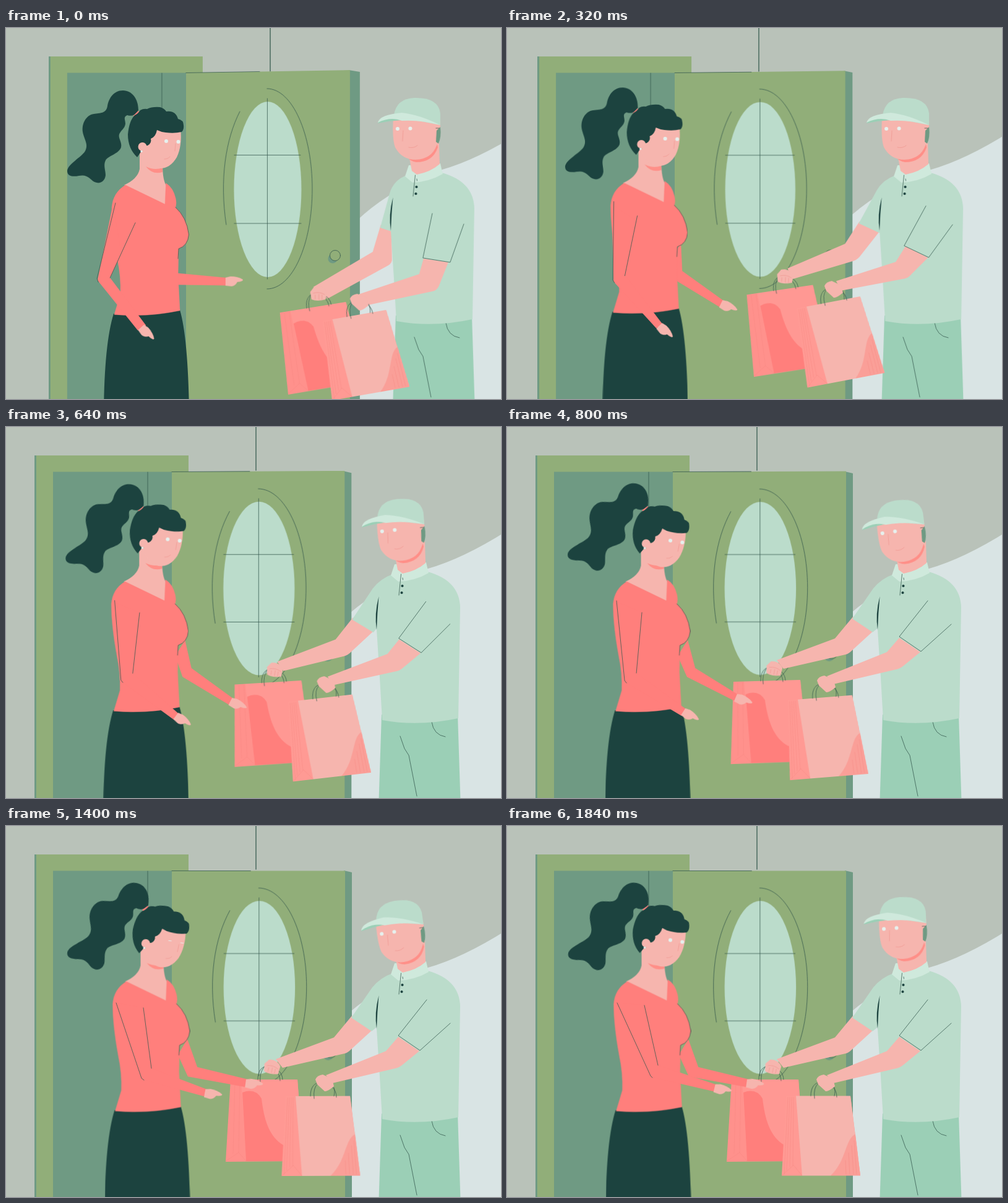
An HTML page without scripts for the animation above (1.88 s loop, 800x600 px).

```html
<!DOCTYPE html>
<html lang="en">
<head>
<meta charset="utf-8">
<title>Doorstep delivery</title>
<style>
html, body { margin: 0; width: 100%; height: 100%; overflow: hidden; background: #b9c2b9; }
svg { display: block; width: 100vw; height: 100vh; }
.m { animation: 1880ms cubic-bezier(.3, .5, .7, .9) infinite; }

.wall { fill: #b9c2b9; }
.ground { fill: #d9e4e4; }
.green { fill: #91ae79; }
.shade { fill: #6f9a83; }
.mint { fill: #bbdccb; }
.pale { fill: #cfe9dc; }
.jade { fill: #9bcfb6; }
.skin { fill: #f6b5ae; }
.blush { fill: #ff8f88; }
.coral { fill: #ff7f7c; stroke: #ff7f7c; stroke-width: .4; stroke-linejoin: round; }
.dark { fill: #1c433f; }
.eye { fill: #e6f1ee; }
.line { fill: none; stroke: #35584e; stroke-width: .9; stroke-linecap: round; stroke-linejoin: round; opacity: .85; }
.cord { stroke-width: 1.5; }
.soft { fill: none; stroke: #f09a93; stroke-width: .8; stroke-linecap: round; }
.crease { fill: none; stroke: #f3837e; stroke-width: .7; opacity: .55; }

.pan { animation-name: pan; }
@keyframes pan {
  8.51% { transform: translateX(-14px); }
  25.53%, to { transform: translateX(-23px); }
}

.front { animation-name: front; }
@keyframes front {
  0% { d: path("M291 72.5L556 68V620H291Z"); }
  8.51% { d: path("M291 72.5L562 68V620H291Z"); }
  25.53% { d: path("M291 72.5L569 70V620H291Z"); }
  42.55% { d: path("M291 72.5L571 71.5V620H291Z"); }
  59.57%, to { d: path("M291 72.5L571 72.5V620H291Z"); }
}
.side { animation-name: side; }
@keyframes side {
  0% { d: path("M554 68L572 71V620H554Z"); }
  8.51% { d: path("M560 68L575 71V620H560Z"); }
  25.53% { d: path("M567 70L580 72.5V620H567Z"); }
  42.55%, to { d: path("M569 72L582 75V620H569Z"); }
}
.rim { transform-origin: 291px 72.5px; animation-name: rim; }
@keyframes rim {
  0% { transform: rotate(-1deg) scaleX(1); }
  25.53% { transform: rotate(-.5deg) scaleX(1.05); }
  59.57%, to { transform: rotate(0deg) scaleX(1.07); }
}
.panel { transform-origin: 291px 260px; animation-name: panel; }
@keyframes panel {
  0% { transform: translateX(0) scale(1, 1); }
  8.51% { transform: translateX(.5px) scale(1.0226, 1); }
  25.53% { transform: translateX(1px) scale(1.05, .993); }
  42.55%, to { transform: translateX(1.5px) scale(1.06, .986); }
}

/* courier */
.nod { transform-origin: 670px 200px; animation-name: nod; }
@keyframes nod {
  0%, 25.53% { transform: translate(0, 0) rotate(0deg); }
  42.55% { transform: translate(1px, 4px) rotate(-7deg); }
  59.57%, 74.47% { transform: translate(2px, 6px) rotate(-8deg); }
  97.87%, to { transform: translate(1px, 1.5px) rotate(-3deg); }
}
.farArm { animation-name: farArm; }
@keyframes farArm {
  0% { d: path("M606 318L593 362L497 419L520 438L618 384Q625 380 624 372L623 324Z"); }
  8.51% { d: path("M596 317L576 355L487 398L494 416L598 380Q604 378 608 372L624 326Z"); }
  25.53% { d: path("M586 311L561 346L466 384L474 401L570 375Q575 374 580 369L623 328Z"); }
  42.55%, to { d: path("M582 307L553 342L459 377L470 391L570 368Q575 367 581 361L616 329Z"); }
}
.farSleeve { animation-name: farSleeve; }
@keyframes farSleeve {
  0% { d: path("M648 238Q626 246 620 268L605 323L623 329L640 290Z"); }
  8.51% { d: path("M648 238Q626 246 618 264L595 320L622 329L640 290Z"); }
  25.53% { d: path("M648 238Q628 245 617 262L585 314L622 333L640 290Z"); }
  42.55%, to { d: path("M648 238Q628 245 615 261L581 310L614 332L640 310Z"); }
}
.nearArm { animation-name: nearArm; }
@keyframes nearArm {
  0% { d: path("M675 373L668 398L570 431L582 449L690 426Q697 424 700 417L715 379Z"); }
  8.51% { d: path("M669 363L656 388L559 417L569 434L674 413Q681 411 685 405L706 376Z"); }
  25.53% { d: path("M661 348L644 373L548 405L555 420L657 401Q663 400 668 394L697 369Z"); }
  42.55%, to { d: path("M657 341L637 364L540 403L550 416L652 392Q658 391 664 386L691 364Z"); }
}
.cuff { animation-name: cuff; }
@keyframes cuff {
  0% { d: path("M689 300L674 372L718 379L740 317"); }
  8.51% { d: path("M693 293L667 362L708 375L740 318"); }
  25.53% { d: path("M699 285L659 347L698 369L740 318"); }
  42.55%, to { d: path("M703 281L657 339L692 363L741 319"); }
}
.fistA { animation-name: fistA; }
@keyframes fistA {
  0% { transform: translate(505px, 429px); }
  8.51% { transform: translate(469px, 411px); }
  25.53% { transform: translate(439px, 396px) rotate(6deg); }
  42.55% { transform: translate(432px, 390px) rotate(10deg); }
  59.57%, to { transform: translate(430px, 389px) rotate(12deg); }
}
.fistB { animation-name: fistB; }
@keyframes fistB {
  0% { transform: translate(571px, 443px); }
  8.51% { transform: translate(543px, 430px); }
  25.53% { transform: translate(520px, 418px); }
  42.55% { transform: translate(516px, 415px); }
  59.57%, to { transform: translate(515px, 415px); }
}

/* bags swing from their top left corner */
.bagA { animation-name: bagA; }
@keyframes bagA {
  0% { transform: translate(443px, 460.5px) rotate(-9.2deg); }
  8.51% { transform: translate(409px, 443.5px) rotate(-11.2deg); }
  25.53% { transform: translate(376px, 425px) rotate(-7deg); }
  42.55% { transform: translate(366px, 412px) rotate(-1.6deg); }
  59.57% { transform: translate(362px, 410.5px) rotate(-.2deg); }
  74.47%, to { transform: translate(363px, 410px) rotate(0deg); }
}
.bagB { animation-name: bagB; }
@keyframes bagB {
  0% { transform: translate(512px, 474px) rotate(-9.9deg); }
  8.51% { transform: translate(484px, 462px) rotate(-11.8deg); }
  25.53% { transform: translate(460px, 449px) rotate(-10.2deg); }
  42.55% { transform: translate(454px, 442px) rotate(-4.6deg); }
  59.57% { transform: translate(449px, 436.5px) rotate(.2deg); }
  74.47% { transform: translate(452px, 437px) rotate(-.2deg); }
  97.87%, to { transform: translate(451px, 436.5px) rotate(0deg); }
}

/* customer */
.body { animation-name: body; }
@keyframes body {
  8.51% { transform: translate(-4.5px, -2px); }
  25.53% { transform: translate(-3px, -4px); }
  42.55% { transform: translate(.5px, -4px); }
  59.57%, to { transform: translate(1.5px, -2.5px); }
}
.head { transform-origin: 235px 215px; animation-name: head; }
@keyframes head {
  0% { transform: translate(0, 0) rotate(0deg); }
  8.51% { transform: translate(-4.5px, -2px) rotate(0deg); }
  25.53% { transform: translate(-2.5px, -5px) rotate(-.5deg); }
  42.55% { transform: translate(1.8px, -2px) rotate(6deg); }
  59.57%, 74.47% { transform: translate(2.3px, -.4px) rotate(7.2deg); }
  97.87%, to { transform: translate(1.8px, -1.2px) rotate(6deg); }
}
.tail { transform-origin: 211px 138px; animation-name: tail; }
@keyframes tail {
  0% { transform: translate(0, 0) rotate(0deg); }
  8.51% { transform: translate(-4px, -2.5px) rotate(.5deg); }
  25.53% { transform: translate(-2px, -5px) rotate(2deg); }
  42.55% { transform: translate(13px, -6.5px) rotate(9.5deg); }
  59.57%, 74.47% { transform: translate(15px, -5.5px) rotate(10.3deg); }
  97.87%, to { transform: translate(13.5px, -6px) rotate(9.3deg); }
}
.reach { animation-name: reach; }
@keyframes reach {
  0% { d: path("M278 350L270 396L358 404L356 416L272 415L262 380Z"); }
  8.51% { d: path("M275 350L268 399L343 424L338 433L270 416L262 380Z"); }
  25.53% { d: path("M284 345L291 390L356 452L347 461L275 404L270 370Z"); }
  42.55% { d: path("M292 345L304 390L375 434L368 443L291 404L276 370Z"); }
  59.57% { d: path("M293 345L307 389L387 419L383 430L294 405L278 370Z"); }
  74.47%, to { d: path("M293 345L309 390L391 410L387 422L294 405L278 370Z"); }
}
.reachHand { animation-name: reachHand; }
@keyframes reachHand {
  0% { transform: translate(357px, 410.5px) rotate(0deg); }
  8.51% { transform: translate(340px, 429px) rotate(14deg); }
  25.53% { transform: translate(351px, 457px) rotate(33deg); }
  42.55% { transform: translate(371px, 439px) rotate(23deg); }
  59.57% { transform: translate(385px, 425px) rotate(12deg); }
  74.47%, to { transform: translate(389px, 417px) rotate(8deg); }
}
.arm { animation-name: arm; }
@keyframes arm {
  0% { d: path("M173 285L148 408L213 489L226 481L168 404L186 365Z"); }
  8.51% { d: path("M168 285L158 410L225 488L236 483L178 402L200 330Z"); }
  25.53% { d: path("M170 285L180 410L250 484L261 479L198 399L212 301Z"); }
  42.55% { d: path("M176 282L190 412L282 467L290 457L209 398L218 300Z"); }
  59.57% { d: path("M177 284L207 412L305 448L313 437L223 397L221 298Z"); }
  74.47% { d: path("M177 286L221 410L320 437L327 427L235 392L222 294Z"); }
  97.87%, to { d: path("M177 286L234 406L334 429L340 419L244 387L223 290Z"); }
}
.folds { animation-name: folds; }
@keyframes folds {
  0% { d: path("M177 283L147 405L149 411M209 315L168 404"); }
  8.51% { d: path("M172 282L158 407L160 412M208 309L178 404"); }
  25.53% { d: path("M173 280L178 408L181 412M212 301L197 399"); }
  42.55% { d: path("M177 281L190 410L193 414M218 300L209 398"); }
  59.57% { d: path("M178 284L206 411L209 414M221 298L223 397"); }
  74.47% { d: path("M178 286L219 408L223 411M222 294L235 392"); }
  97.87%, to { d: path("M178 286L232 404L235 407M222 290L244 387"); }
}
.armHand { animation-name: armHand; }
@keyframes armHand {
  0% { transform: translate(219px, 486px) rotate(48deg); }
  8.51% { transform: translate(230px, 486px) rotate(50deg); }
  25.53% { transform: translate(256px, 482px) rotate(43deg); }
  42.55% { transform: translate(286px, 462px) rotate(33deg); }
  59.57% { transform: translate(309px, 443px) rotate(22deg); }
  74.47% { transform: translate(323px, 433px) rotate(11deg); }
  97.87%, to { transform: translate(337px, 425px) rotate(14deg); }
}

.blinkA, .blinkB { transform-box: fill-box; transform-origin: center; }
.blinkA { animation-name: blinkA; }
.blinkB { animation-name: blinkB; }
@keyframes blinkA { 55.5%, 64% { transform: scaleY(1); } 59.57% { transform: scaleY(.25); } }
@keyframes blinkB { 70.5%, 79% { transform: scaleY(1); } 74.47% { transform: scaleY(.2); } }
</style>
</head>
<body>
<svg viewBox="0 0 800 600" preserveAspectRatio="none">
  <defs>
    <path id="hand" class="skin" d="M-2-7L6-9Q18-9 26-4Q27-1 17 0Q14 6 8 7L-2 6Z"/>
    <path id="hatch" class="crease" d="M3 2L-3 127M6 2L1 120M9 2L6 115M12 2L11 113"/>
  </defs>
  <rect class="wall" width="800" height="600"/>

  <g class="m pan">
    <path class="ground" d="M540 340Q600 268 705 229Q772 210 860 150V620H540Z"/>
    <path class="shade" d="M69 46H80V620H69Z"/>
    <path class="green" d="M72 46H318V620H72Z"/>
    <path class="shade" d="M99 72.5H300V620H99Z"/>
    <path class="line" d="M252 73V135"/>
    <path class="line cord" d="M427 0V70"/>
    <path class="m side shade" d="M554 68L572 71V620H554Z"/>
    <path class="m front green" d="M291 72.5L556 68V620H291Z"/>
    <path class="m rim line" d="M291 72.5H410"/>
    <g class="m panel">
      <ellipse class="mint" cx="423" cy="261" rx="54.5" ry="142"/>
      <path class="line" d="M422.5 114V406M369 205.5H476M369 316H477"/>
      <path class="line" d="M422 98C463 98 495 172 495 260C495 350 463 422 422 422M378 135C355 180 345 245 356 318"/>
      <circle class="shade" cx="528" cy="373" r="7.5"/>
      <circle class="green" cx="532" cy="368" r="8.5"/>
      <circle class="line" cx="532" cy="368" r="8.5"/>
    </g>
  </g>

  <g class="m pan">
    <path class="m farArm skin" d="M606 318L593 362L497 419L520 438L618 384Q625 380 624 372L623 324Z"/>
    <path class="m farSleeve mint" d="M648 238Q626 246 620 268L605 323L623 329L640 290Z"/>
    <path class="jade" d="M630 465H753L758 620H625Z"/>
    <path class="line" d="M660 500L667 520L674 531L687 597M711 477Q714 498 733 501"/>
    <path class="mint" d="M650 237L704 234Q756 248 757 292L754 471Q690 485 631 474Q627 400 622 328L626 265Z"/>
    <path class="dark" d="M625.5 274Q618 302 622 328Q623 300 625.5 274Z"/>
    <path class="pale" d="M651 222L645 240L657 250Q684 249 706 236L702 219Z"/>
    <path class="skin" d="M650 200L656 231L664 237Q686 233 701 220L700 185Z"/>
    <path class="line" d="M661.5 238L658 272M664 244L664.5 247"/>
    <g class="dark"><circle cx="663.5" cy="257" r="2.1"/><circle cx="662.5" cy="268" r="2.1"/></g>

    <g class="m nod">
      <path class="blush" d="M648 208Q682 218 697 188L698 193Q690 217 663 217Q654 216 648 208Z"/>
      <path class="skin" d="M626 145Q624 180 629 193Q640 213 662 213Q688 212 696 190L702 166V150Z"/>
      <path class="shade" d="M702 160L696 166L695 184L699 187Q704 176 702 160Z"/>
      <path class="line" d="M695 162H700"/>
      <path class="soft" d="M642 166L641 183M651 193Q659 195 665 190"/>
      <g class="eye">
        <circle class="m blinkA" cx="633" cy="163" r="3"/>
        <circle class="m blinkA" cx="653.5" cy="162.5" r="3"/>
      </g>
      <path class="mint" d="M627 141Q631 114 660 113Q699 112 702 138V157Q664 150 627 141Z"/>
      <path class="jade" d="M601 154Q604 146 613 143L640 149Q620 150 601 154Z"/>
      <path class="pale" d="M601 153Q604 140 640 137Q668 140 702 157Q668 148 640 150Q622 143 601 153Z"/>
    </g>

    <path class="m nearArm skin" d="M675 373L668 398L570 431L582 449L690 426Q697 424 700 417L715 379Z"/>
    <path class="m cuff line" d="M689 300L674 372L718 379L740 317"/>
  </g>

  <g class="m bagA">
    <path fill="#ff918c" d="M0 0H108L118 132L-8 133Z"/>
    <path fill="#ff9893" d="M17 0H108L118 132H25Z"/>
    <path fill="#ff7f7c" d="M19 21Q40 13 50 31C54 65 62 92 85 106L117 113L118 132H25Z"/>
    <path class="crease" d="M15 1L13 118L-8 132M13 118L25 132M7 2L4 120"/>
    <path class="line" d="M44 0C44-14 50-20 58-22M48 5Q46-10 54-20M78-14Q84-8 84 0M75-12Q80-6 80 2"/>
  </g>
  <g class="m fistA">
    <path class="skin" d="M-13-2L-7-10Q6-13 13-3L12 10Q-2 14-11 10Z"/>
    <path class="soft" d="M-8 0Q2-3 10 2M-5 3V9M1 2V10M6 3V10"/>
  </g>
  <g class="m bagB">
    <path fill="#ff9a94" d="M0 0H104L120 129H-7Z"/>
    <use href="#hatch"/>
    <path class="crease" d="M-7 129L12 112L26 129"/>
    <path class="skin" d="M16 0H104L120 129H26Z"/>
    <path fill="#fa9f98" d="M112 62C95 70 98 105 72 129H120Z"/>
    <path class="crease" d="M106 80L109 127M110 72L114 127M101 92L103 127M96 104L97 127"/>
    <path class="line" d="M40 0C40-14 46-22 56-22M46 4Q44-14 52-20M78 0Q80-8 78-14M82 2Q82-8 76-14"/>
  </g>
  <g class="m fistB">
    <path class="skin" d="M-15-5Q-12-12-3-13L12-6L15 6Q4 15 0 14L-12 3Z"/>
  </g>

  <path class="m reach coral" d="M278 350L270 396L358 404L356 416L272 415L262 380Z"/>
  <use class="m reachHand" href="#hand"/>
  <g class="m body">
    <path class="dark" d="M174 462Q230 467 281 456Q294 500 296 620H158Q159 510 174 462Z"/>
    <path class="skin" d="M216 195V228Q213 244 191 254L258 287L260 256Q253 248 253 220Z"/>
    <path class="blush" d="M226 224Q240 231 253 226V233Q237 238 226 224Z"/>
    <path class="coral" d="M193 254L257 285L258.5 251Q270 258 274 275Q276 283 274 290Q292 306 295.5 334Q294 352 279 357L278 400L281 457Q230 468 175 463.500L185 430Q186 402 180 374Q171 325 171 290Q173 266 193 254Z"/>
    <path class="line" d="M274 290Q292 306 295.5 334Q294 352 279 357L278 373"/>
  </g>
  <g class="m tail">
    <path class="dark" d="M214 133C214 115 204 101 189 101C174 101 166 114 164 126C162 139 152 137 142 139C128 141 122 157 124 168C126 180 134 188 128 199C122 209 100 220 99 231C99 240 108 241 118 239C132 236 136 245 143 249C152 253 160 248 161 238C161 230 157 222 161 214C166 206 182 204 186 193C188 185 181 178 183 172C185 166 192 163 193 155C193 148 189 144 196 141C203 143 208 142 214 133Z"/>
    <path class="coral" d="M206 142L214 134L216 140L209 145Z"/>
  </g>
  <g class="m head">
    <path class="skin" d="M236 160L282 163Q285 190 276 209Q265 228 247 227Q229 224 220 203Z"/>
    <path class="dark" d="M212 209Q197 195 197 172Q199 150 208 141Q214 138 217 133Q222 130 228 131Q236 127 249 128Q256 130 259 135Q274 133 278 147Q287 149 287 157Q288 164 284 168Q272 171 258 169Q250 168 244 165Q242 176 234 179Q236 186 229 190Q221 190 219 199Z"/>
    <circle class="skin" cx="220.5" cy="192" r="7"/>
    <circle class="eye" cx="219" cy="199.5" r="1.7"/>
    <path class="soft" d="M274 187L273 199M256 212Q262 212 265 208"/>
    <g class="eye">
      <circle class="m blinkB" cx="259" cy="183" r="3"/>
      <circle class="m blinkB" cx="278.5" cy="184" r="3"/>
    </g>
  </g>
  <path class="m arm coral" d="M173 285L148 408L213 489L226 481L168 404L186 365Z"/>
  <path class="m folds line" d="M177 283L147 405L149 411M209 315L168 404"/>
  <use class="m armHand" href="#hand"/>
</svg>
</body>
</html>
```
